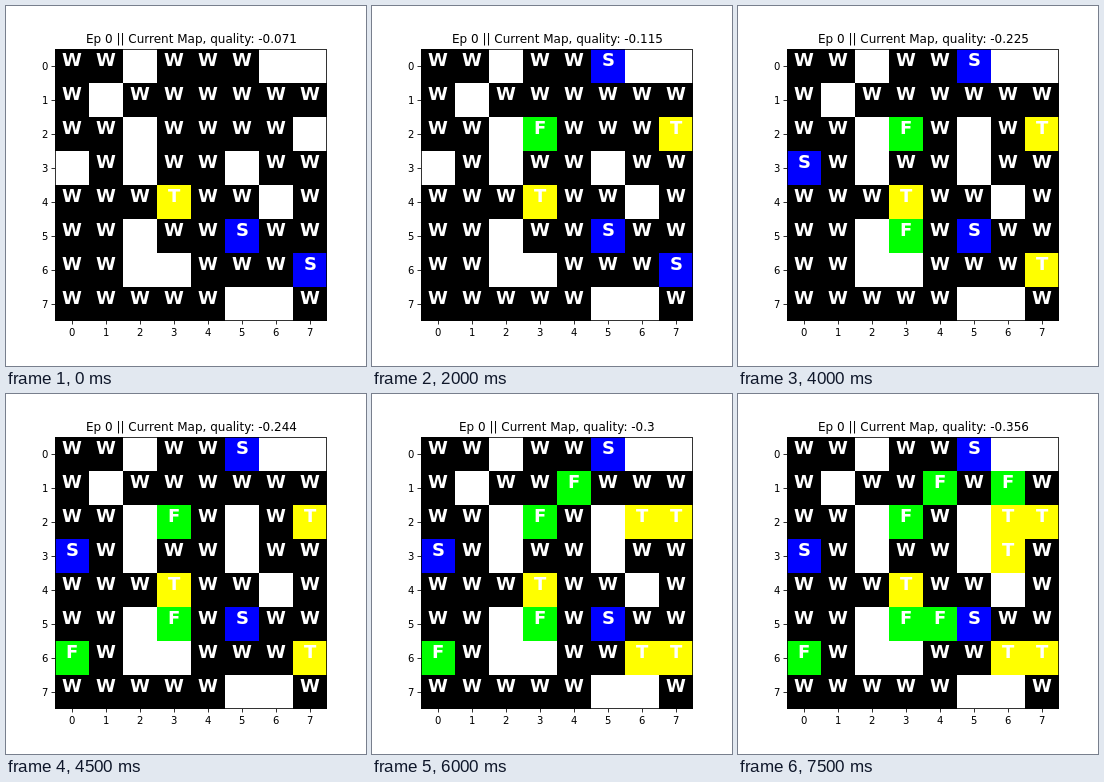
An HTML page with a canvas that plays this animation: 360 by 360 pixels, repeating every 8 s.

```html
<!DOCTYPE html>
<html lang="en">
<head>
<meta charset="utf-8">
<title>Current Map</title>
<style>
html, body { margin: 0; width: 100%; height: 100%; overflow: hidden; background: #fff; }
canvas { display: block; width: 360px; height: 360px; }
</style>
</head>
<body>
<canvas id="map" width="360" height="360"></canvas>
<script>
const ctx = document.getElementById('map').getContext('2d');
const LOOP = 8000, STEP = 500;
const LEFT = 49, TOP = 43, CELL = 34, SIZE = 8 * CELL;
const FONT = '"DejaVu Sans", sans-serif';
const COLORS = { W: '#000', S: '#00f', T: '#ff0', F: '#0f0', '.': '#fff' };

const START = [
  'WW.WWW..',
  'W.WWWWWW',
  'WW.WWWW.',
  '.W.WW.WW',
  'WWWTWW.W',
  'WW.WWSWW',
  'WW..WWWS',
  'WWWWW..W'
];

// One edit per step, from 1000 ms on: row, column, tile, quality
const EDITS = [
  [0, 5, 'S', '-0.09'],
  [2, 3, 'F', '-0.096'],
  [2, 7, 'T', '-0.115'],
  [6, 7, 'T', '-0.115'],
  [3, 0, 'S', '-0.121'],
  [2, 5, '.', '-0.206'],
  [5, 3, 'F', '-0.225'],
  [6, 0, 'F', '-0.244'],
  [6, 6, 'T', '-0.262'],
  [1, 4, 'F', '-0.281'],
  [2, 6, 'T', '-0.3'],
  [5, 4, 'F', '-0.319'],
  [1, 6, 'F', '-0.338'],
  [3, 6, 'T', '-0.356']
];

const midX = c => LEFT + (c + 0.5) * CELL;
const midY = r => TOP + (r + 0.5) * CELL;

// Text starts on a whole pixel; align is 0.5 for centred, 1 for right
function label(text, x, y, font, color, align = 0.5) {
  ctx.font = font + ' ' + FONT;
  ctx.fillStyle = color;
  const w = ctx.measureText(text).width;
  ctx.fillText(text, Math.round(x - w * align), y);
}

function drawAxes() {
  ctx.strokeStyle = ctx.fillStyle = 'rgba(0,0,0,0.8)';
  ctx.lineWidth = 1;
  ctx.strokeRect(LEFT + 0.5, TOP + 0.5, SIZE - 1, SIZE - 1);
  for (let i = 0; i < 8; i++) {
    ctx.fillRect(midX(i), TOP + SIZE, 1, 3.5);
    ctx.fillRect(LEFT - 3.5, midY(i), 3.5, 1);
  }
  for (let i = 0; i < 8; i++) {
    label(String(i), midX(i), 330, '10px', '#000');
    label(String(i), 42, midY(i) + 4, '10px', '#000', 1);
  }
}

function draw(count) {
  const grid = START.map(row => [...row]);
  let quality = '-0.071';
  for (const [r, c, tile, q] of EDITS.slice(0, count)) {
    grid[r][c] = tile;
    quality = q;
  }
  ctx.fillStyle = '#fff';
  ctx.fillRect(0, 0, 360, 360);
  grid.forEach((row, r) => row.forEach((tile, c) => {
    ctx.fillStyle = COLORS[tile];
    ctx.fillRect(LEFT + c * CELL, TOP + r * CELL, CELL, CELL);
  }));
  drawAxes();
  grid.forEach((row, r) => row.forEach((tile, c) => {
    if (tile !== '.') label(tile, midX(c), midY(r), 'bold 18px', '#fff');
  }));
  label('Ep 0 || Current Map, quality: ' + quality, 185, 37, '12px', '#000');
}

let shown = -1;
function tick() {
  const count = Math.max(0, Math.floor(performance.now() % LOOP / STEP) - 1);
  if (count !== shown) draw(shown = count);
  requestAnimationFrame(tick);
}
tick();
</script>
</body>
</html>
```
